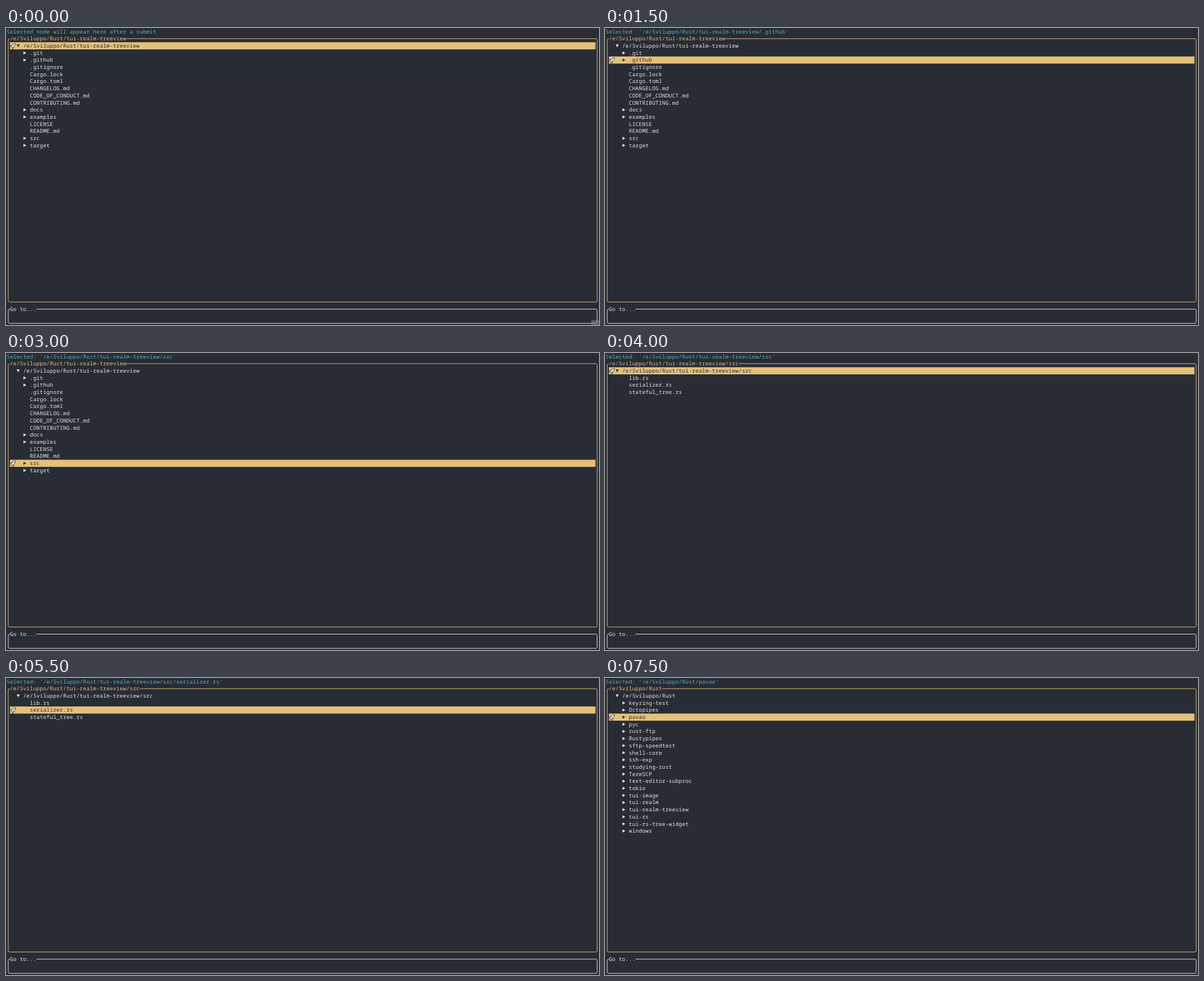
Animation of 1056 by 530 pixels, one loop 8000 ms. Source, as an HTML page:

```html
<!DOCTYPE html>
<html lang="en">
<head>
<meta charset="utf-8">
<title>Tree view</title>
<style>
  html, body { margin: 0; width: 100%; height: 100%; overflow: hidden; background: #282c34; }
  svg { display: block; width: 1056px; height: 530px; }
  text {
    font: 9.5px "Noto Sans Mono", "DejaVu Sans Mono", monospace;
    letter-spacing: .225px;
    text-rendering: geometricPrecision;
    white-space: pre;
  }
</style>
</head>
<body>
<svg id="stage" viewBox="0 0 1056 530" xmlns="http://www.w3.org/2000/svg"></svg>
<script>
const CELL_W = 5.925, CELL_H = 12.7, LEFT = 1, LOOP = 8000;
const BG = '#282c34', FG = '#e6e6e6', GOLD = '#e5c07b', CYAN = '#56b6c2';

const BASE = '/e/Sviluppo/Rust';
const REPO = BASE + '/tui-realm-treeview';
const SRC = REPO + '/src';

// A leading ">" marks a closed folder.
const trees = {
  [REPO]: '>.git >.github .gitignore Cargo.lock Cargo.toml CHANGELOG.md CODE_OF_CONDUCT.md ' +
    'CONTRIBUTING.md >docs >examples LICENSE README.md >src >target',
  [SRC]: 'lib.rs serializer.rs stateful_tree.rs',
  [BASE]: '>keyring-test >Octopipes >pavao >pyc >rust-ftp >Rustypipes >sftp-speedtest ' +
    '>shell-core >ssh-exp >studying-rust >TermSCP >text-editor-subproc >tokio >tui-image ' +
    '>tui-realm >tui-realm-treeview >tui-rs >tui-rs-tree-widget >windows'
};

// start time, open folder, highlighted line (0 is the root), submitted path
const steps = [
  [0, REPO, 0, null],
  [500, REPO, 1, REPO + '/.git'],
  [1500, REPO, 2, REPO + '/.github'],
  [2000, REPO, 6, REPO + '/CHANGELOG.md'],
  [2500, REPO, 9, REPO + '/docs'],
  [3000, REPO, 13, SRC],
  [4000, SRC, 0, SRC],
  [5000, SRC, 1, SRC + '/lib.rs'],
  [5500, SRC, 2, SRC + '/serializer.rs'],
  [6500, REPO, 0, REPO],
  [7000, BASE, 0, BASE],
  [7500, BASE, 3, BASE + '/pavao']
];

const colX = c => LEFT + c * CELL_W;
const rowY = r => r * CELL_H;

function label(str, col, row, color) {
  return `<text x="${colX(col)}" y="${rowY(row) + 9.5}" fill="${color}">${str}</text>`;
}

function panel(title, top, bottom, color) {
  const x1 = colX(.5), x2 = colX(177.5), y1 = rowY(top + .5), y2 = rowY(bottom + .5), r = 2.5;
  const gap = colX(1 + title.length);
  return `<path d="M${gap} ${y1}H${x2 - r}Q${x2} ${y1} ${x2} ${y1 + r}V${y2 - r}` +
    `Q${x2} ${y2} ${x2 - r} ${y2}H${x1 + r}Q${x1} ${y2} ${x1} ${y2 - r}V${y1 + r}` +
    `Q${x1} ${y1} ${x1 + r} ${y1}H${colX(1)}" fill="none" stroke="${color}"/>` +
    label(title, 1, top, color);
}

function arrow(col, row, open, color) {
  const shape = open ? 'M-2.7 -2.6H2.7L0 2.8Z' : 'M-2.5 -2.7L2.7 0L-2.5 2.7Z';
  return `<path transform="translate(${colX(col + .5)} ${rowY(row + .5)})" d="${shape}" fill="${color}"/>`;
}

function rocket(row) {
  return `<g transform="translate(12.6 ${rowY(row + .5)}) rotate(45)" stroke="${BG}" stroke-width=".8" stroke-linejoin="round">` +
    '<path d="M-2 0L-4 3V5L-1.5 3.6H1.5L4 5V3L2 0Z" fill="#d5dbe0"/>' +
    '<path d="M0 -6.2Q2.4 -3.6 2.2 0L1.5 3.8H-1.5L-2.2 0Q-2.4 -3.6 0 -6.2Z" fill="#f1f3f5"/>' +
    '<circle cy="-1.6" r=".8" fill="#6aa5c4" stroke="none"/></g>';
}

function scene([, dir, picked, path]) {
  const message = path ? `Selected: '${path}'` : 'Selected node will appear here after a submit';
  const ink = i => i === picked ? BG : FG;
  let out = label(message, 0, 0, CYAN) + panel(dir, 1, 38, GOLD) + panel('Go to...', 39, 41, FG);
  out += `<rect x="${colX(1)}" y="${rowY(picked + 2)}" width="${176 * CELL_W}" height="${CELL_H}" fill="${GOLD}"/>`;
  out += rocket(picked + 2) + arrow(3, 2, true, ink(0)) + label(dir, 5, 2, ink(0));
  trees[dir].split(' ').forEach((entry, i) => {
    const row = i + 3, color = ink(i + 1);
    if (entry[0] === '>') out += arrow(5, row, false, color);
    out += label(entry.replace('>', ''), 7, row, color);
  });
  if (!path) out += '<rect x="1042" y="521.5" width="14" height="8.5" fill="#8b8e94" opacity=".5"/>';
  return out;
}

const stage = document.getElementById('stage');
let shown = null;

function draw(now) {
  const t = now % LOOP;
  const step = steps.filter(s => s[0] <= t).pop();
  if (step !== shown) {
    stage.innerHTML = scene(step);
    shown = step;
  }
}

const start = performance.now();
function tick() {
  draw(performance.now() - start);
  requestAnimationFrame(tick);
}
tick();
</script>
</body>
</html>
```
